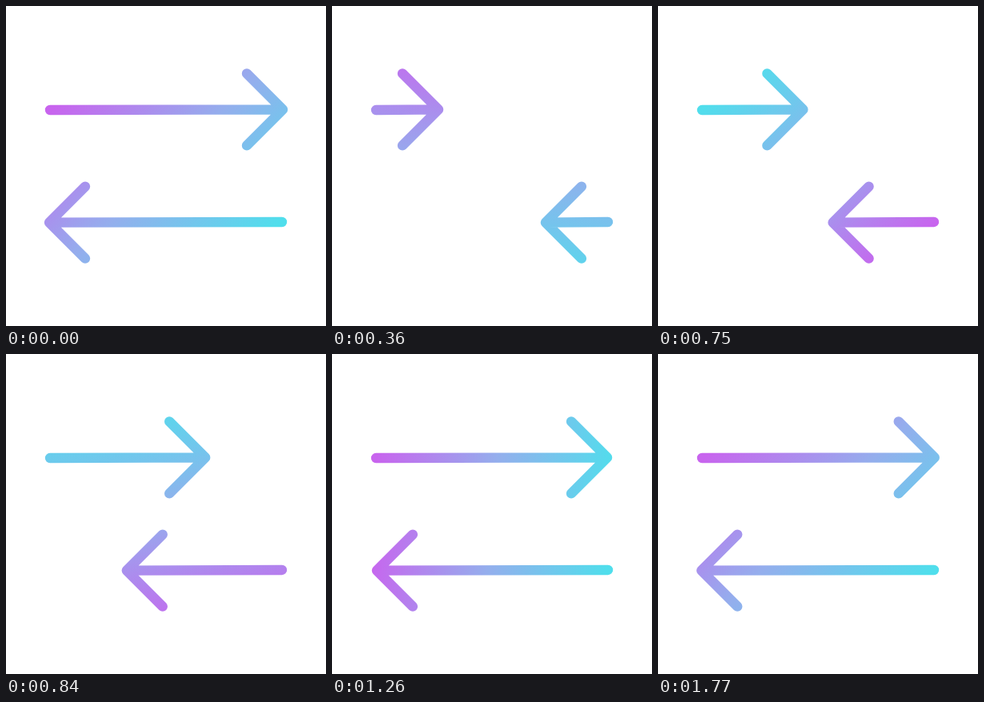
Recreate the animation shown at these times as an HTML page with a canvas. Size 400 by 400 pixels, loop 3.8 s.

```html
<!DOCTYPE html>
<html lang="en">
<head>
<meta charset="utf-8">
<title>Swap arrows</title>
<style>
html, body { margin: 0; width: 100%; height: 100%; overflow: hidden; background: #fff; }
canvas { display: block; width: 100vmin; height: 100vmin; }
</style>
</head>
<body>
<canvas id="stage"></canvas>
<script>
const SIZE = 400, LOOP = 3800, STEP = 30, LAST = 1770, END = 1800;
const canvas = document.getElementById('stage');
const ctx = canvas.getContext('2d');
const ratio = window.devicePixelRatio || 1;
canvas.width = canvas.height = SIZE * ratio;
ctx.scale(ratio, ratio);

// Cubic easing with handles (x1, 0) and (x2, 1), solved by bisection.
function ease(p, x1, x2) {
  if (p <= 0) return 0;
  if (p >= 1) return 1;
  let lo = 0, hi = 1, s = 0.5;
  for (let i = 0; i < 30; i++) {
    s = (lo + hi) / 2;
    const r = 1 - s;
    const x = 3 * r * r * s * x1 + 3 * r * s * s * x2 + s * s * s;
    if (x < p) lo = s; else hi = s;
  }
  return s * s * (3 - 2 * s);
}

// How far the arrow heads are pulled back: [start, end, from, to, x1, x2]
const pulls = [
  [0, 470, 0, 240, 0.42, 0.58],
  [490, 1180, 240, 0, 0.5, 0.4],
  [1180, 1490, 0, 13.5, 0.4, 0.6],
  [1490, END, 13.5, 0, 0.4, 0.6]
];

function pullAt(t) {
  let pull = 0;
  for (const [start, end, from, to, x1, x2] of pulls) {
    if (t >= start) pull = from + (to - from) * ease((t - start) / (end - start), x1, x2);
  }
  return pull;
}

function gradientAt(t) {
  const angle = Math.PI / 4 + 2 * Math.PI * ease(t / END, 0.33, 0.43);
  const dx = 150 * Math.cos(angle), dy = 150 * Math.sin(angle);
  const g = ctx.createLinearGradient(200 - dx, 200 - dy, 200 + dx, 200 + dy);
  g.addColorStop(0, '#c864ee');
  g.addColorStop(0.5, '#94aeed');
  g.addColorStop(1, '#50deec');
  return g;
}

function arrow(tail, tailY, tip, tipY, dir) {
  const back = tip - 45 * dir;
  ctx.beginPath();
  ctx.moveTo(tail, tailY);
  ctx.lineTo(tip, tipY);
  ctx.moveTo(back, tipY - 45);
  ctx.lineTo(tip, tipY);
  ctx.lineTo(back, tipY + 45);
  ctx.stroke();
}

function draw(t) {
  const pull = pullAt(t);
  ctx.fillStyle = '#fff';
  ctx.fillRect(0, 0, SIZE, SIZE);
  ctx.lineWidth = 12.4;
  ctx.lineCap = ctx.lineJoin = 'round';
  ctx.strokeStyle = gradientAt(t);
  arrow(55, 130, 346 - pull, 129.4, 1);
  arrow(345, 270, 54 + pull, 270.6, -1);
}

const begin = performance.now();
function tick() {
  const t = (performance.now() - begin) % LOOP;
  draw(Math.min(Math.floor(t / STEP) * STEP, LAST));
  requestAnimationFrame(tick);
}
tick();
</script>
</body>
</html>
```
